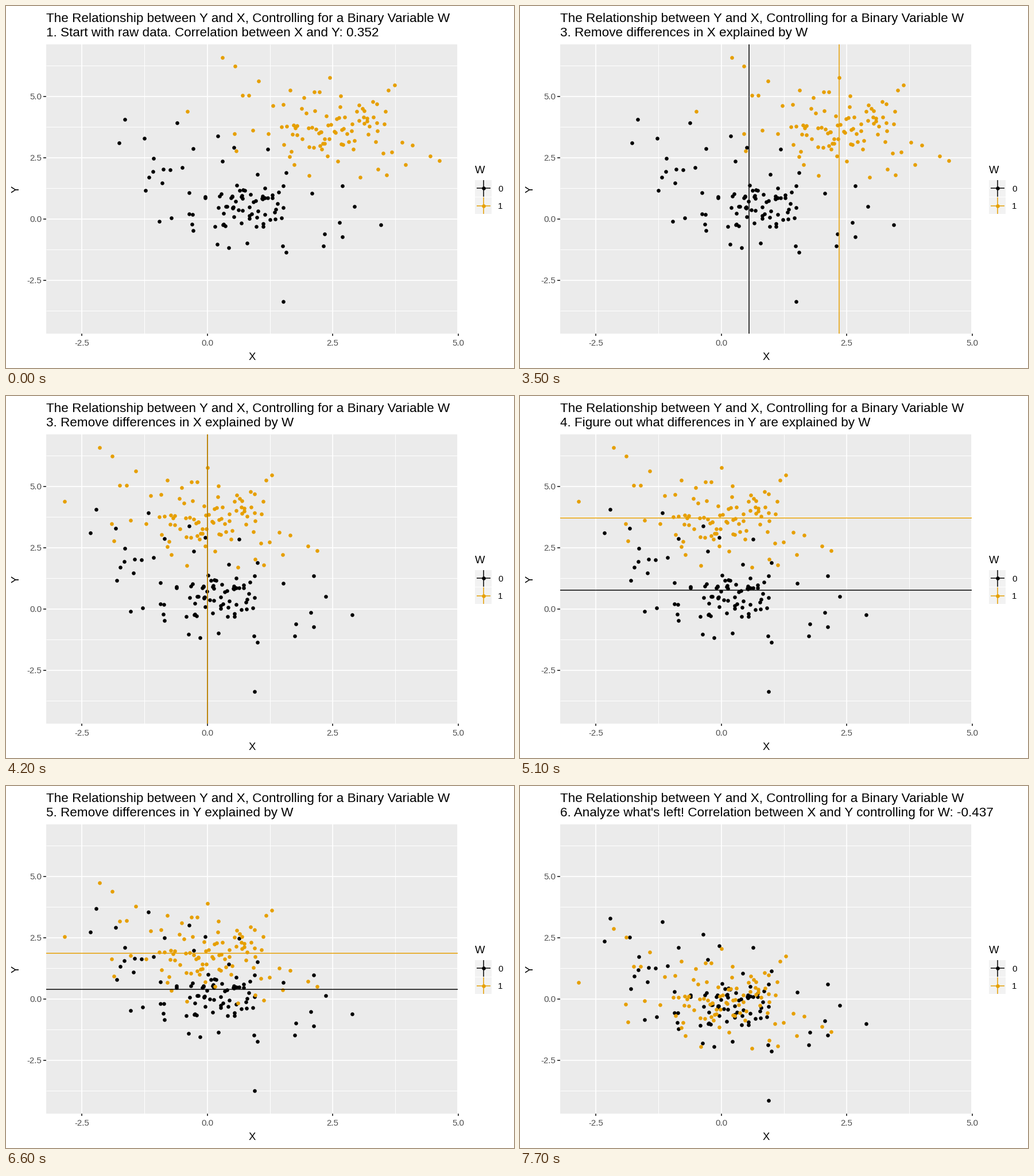
Recreate the animation shown at these times as a matplotlib script. Size 885 px wide and 632 px high, loop 10000 ms.

```python
import numpy as np
import matplotlib.pyplot as plt
from matplotlib.animation import FuncAnimation
from matplotlib.patches import Rectangle

WIDTH, HEIGHT, DPI = 885, 632, 100
STEP, LOOP = 100, 10000
LEFT, RIGHT, TOP, BOTTOM = 70, 787, 66.5, 571.5
COLORS = ["#000000", "#E69F00"]
MEANS = [(0.572, 0.76), (2.44, 3.71)]

HEADING = "The Relationship between Y and X, Controlling for a Binary Variable W"
STAGES = [
    (0, "1. Start with raw data. Correlation between X and Y: 0.352"),
    (2100, "2. Figure out what differences in X are explained by W"),
    (3500, "3. Remove differences in X explained by W"),
    (4900, "4. Figure out what differences in Y are explained by W"),
    (6300, "5. Remove differences in Y explained by W"),
    (7700, "6. Analyze what's left! Correlation between X and Y controlling for W: -0.437"),
]

# Outlying points of each group; the dense middles are drawn at random.
EDGE_0 = [
    (-1.76, 3.1), (-1.64, 4.05), (-1.25, 3.28), (-.6, 3.91), (-1.07, 2.47),
    (-1.08, 1.93), (-1.16, 1.69), (-1.23, 1.16), (-.9, 1.46), (-.88, 2.03),
    (-.74, 2.0), (-.28, 2.86), (.21, 3.38), (.53, 2.91), (1.21, 2.84),
    (.3, 2.35), (1.57, 1.89), (2.09, 1.04), (2.69, 1.35), (2.94, .5),
    (3.46, -.25), (2.64, -.15), (2.34, -.61), (2.69, -.73), (2.32, -1.11),
    (1.5, -1.11), (1.57, -1.37), (1.52, -3.38), (.2, -1.04), (.43, -1.18),
    (.8, -.99), (-.95, -.1), (-.71, .03), (-.3, -.22), (-.5, 2.1),
    (-.36, 1.06), (1.0, 1.8),
]
EDGE_1 = [
    (.3, 6.58), (.55, 6.23), (1.02, 5.62), (.7, 5.03), (.83, 5.04),
    (-.4, 4.38), (.54, 3.48), (.58, 2.77), (.91, 3.62), (1.22, 3.47),
    (1.65, 5.25), (1.52, 4.66), (1.93, 4.94), (2.13, 5.18), (2.44, 5.75),
    (2.24, 5.18), (2.66, 5.02), (3.61, 5.25), (3.73, 5.46), (3.3, 4.78),
    (3.38, 4.68), (3.55, 4.39), (3.09, 4.5), (3.88, 3.11), (4.09, 3.0),
    (4.45, 2.57), (4.63, 2.36), (3.95, 2.21), (3.57, 1.79), (3.4, 2.01),
    (3.05, 1.69), (3.68, 2.73), (2.03, 1.76), (1.73, 2.2), (1.64, 2.53),
    (1.53, 3.03), (3.31, 4.15),
]


def px(x):
    return 350.5 + 87.4 * x


def py(y):
    return 371.5 - 42.8 * y


def pt(size):
    return size * 72 / DPI


def core(rng, mid, spread, low, high, count=63):
    """Normal cloud with a mild downward tilt, cut to a box."""
    dots = []
    while len(dots) < count:
        a, b = rng.normal(size=2)
        dot = np.array(mid) + np.array(spread) * (a, b - 0.25 * a)
        if np.all(dot > low) and np.all(dot < high):
            dots.append(dot)
    return np.array(dots)


rng = np.random.default_rng(12)
groups = [
    np.vstack([EDGE_0, core(rng, (.72, .5), (.65, .65), (-.38, -.55), (1.68, 1.6))]),
    np.vstack([EDGE_1, core(rng, (2.45, 3.5), (.85, .75), (1.3, 2.3), (3.6, 4.7))]),
]

plt.rcParams["font.family"] = "Liberation Sans"
fig = plt.figure(figsize=(WIDTH / DPI, HEIGHT / DPI), dpi=DPI, facecolor="white")
ax = fig.add_axes([0, 0, 1, 1])
ax.set(xlim=(0, WIDTH), ylim=(HEIGHT, 0))
ax.axis("off")


def label(x, y, text, size, color="black", ha="left", **kw):
    kw.setdefault("va", "baseline")
    return ax.text(x, y, text, size=pt(size), color=color, ha=ha, **kw)


def line(xs, ys, color, width, z):
    return ax.plot(xs, ys, color=color, lw=pt(width), zorder=z,
                   solid_capstyle="butt")[0]


def box(x, y, w, h, color):
    ax.add_patch(Rectangle((x, y), w, h, fc=color, lw=0, zorder=0))


def dots(xs, ys, color):
    return ax.plot(xs, ys, "o", color=color, ms=pt(6.6), mew=0, zorder=3)[0]


# Panel, grid and axes
box(LEFT, TOP, RIGHT - LEFT, BOTTOM - TOP, "#EBEBEB")
for v in (-1.25, 1.25, 3.75):
    line([px(v)] * 2, [TOP, BOTTOM], "white", 1, 1)
for v in (-3.75, -1.25, 1.25, 3.75, 6.25):
    line([LEFT, RIGHT], [py(v)] * 2, "white", 1, 1)
for v in (-2.5, 0, 2.5, 5):
    x, y = px(v), py(v)
    line([min(x, RIGHT)] * 2, [TOP, BOTTOM], "white", 1.8, 1)
    line([LEFT, RIGHT], [y] * 2, "white", 1.8, 1)
    line([x] * 2, [BOTTOM, BOTTOM + 4.6], "#333333", 1.8, 2)
    line([LEFT - 4.6, LEFT], [y] * 2, "#333333", 1.8, 2)
    label(x, 593, f"{v:.1f}", 15, "#4D4D4D", "center")
    label(62, y + 5.3, f"{v:.1f}", 15, "#4D4D4D", "right")
label(428.5, 618, "X", 18.5, ha="center")
label(18.5, 319.5, "Y", 18.5, ha="center", va="center", rotation=90)

# Legend
label(817, 292, "W", 18.5)
for i, color in enumerate(COLORS):
    mid = 318 + 30.5 * i
    box(817, mid - 14.5, 29, 29, "#F2F2F2")
    line([831.5] * 2, [mid - 14.5, mid + 14.5], color, 1.5, 2)
    line([820, 844], [mid] * 2, color, 1.5, 2)
    dots([831.5], [mid], color)
    label(857, mid + 6, str(i), 15)

label(70.5, 28, HEADING, 22.45)
caption = label(70.5, 53, "", 22.45)
clouds = [dots([], [], c) for c in COLORS]
rules = [line([], [], c, 1.5, 4) for c in COLORS]


def remaining(t, start):
    """Share of the group mean still present: sine ease in eight steps."""
    p = np.clip((t - start + STEP) / 800, 0, 1)
    return (1 + np.cos(np.pi * p)) / 2


def draw(frame):
    t = frame * STEP
    caption.set_text([text for start, text in STAGES if t >= start][-1])
    kx, ky = remaining(t, 3500), remaining(t, 6300)
    for data, (mx, my), cloud, rule in zip(groups, MEANS, clouds, rules):
        x, y = data.T
        cloud.set_data(px(x - mx * (1 - kx)), py(y - my * (1 - ky)))
        if 2300 <= t < 4900:
            rule.set_data([px(mx * kx)] * 2, [TOP, BOTTOM])
        elif 5100 <= t < 7700:
            rule.set_data([LEFT, RIGHT], [py(my * ky)] * 2)
        else:
            rule.set_data([], [])
    return [caption, *clouds, *rules]


anim = FuncAnimation(fig, draw, frames=LOOP // STEP, interval=STEP,
                     repeat=True, repeat_delay=0, cache_frame_data=False)
plt.show()
```
